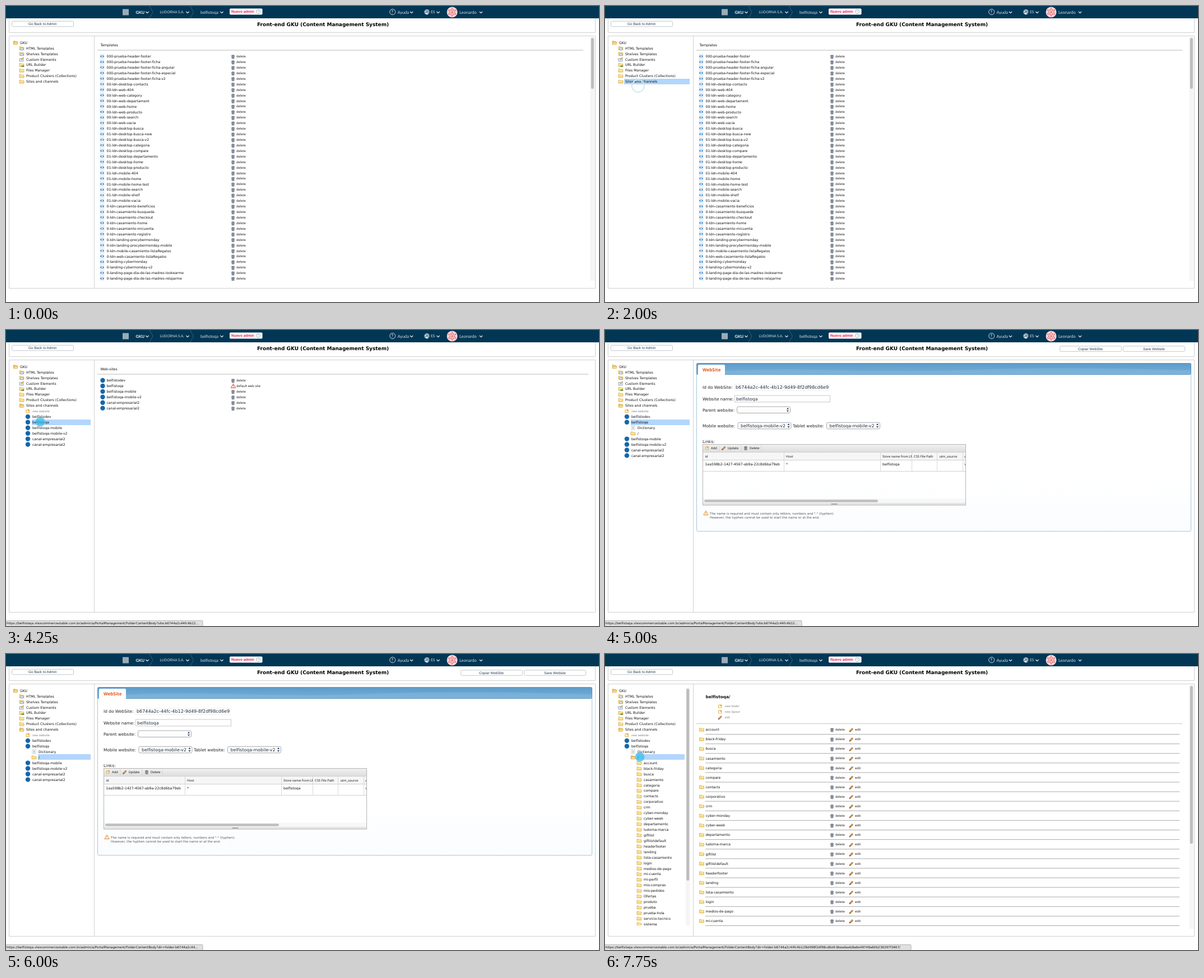
Animation of 1058x529 px, one loop 8 s. Source, as an HTML page:

```html
<!DOCTYPE html>
<html lang="es">
<head>
<meta charset="utf-8">
<title>Site manager</title>
<style>
html, body { margin: 0; height: 100%; overflow: hidden; background: #fff; }
svg { display: block; width: 100vw; height: 100vh; font-family: "DejaVu Sans", sans-serif; text-rendering: geometricPrecision; }
text { white-space: pre; }
.h { font-family: Lato, sans-serif; }
.o { font-family: "Open Sans", sans-serif; }
.a { font-family: "Liberation Sans", sans-serif; }
.b { font-weight: bold; }
.i { font-style: italic; }
</style>
</head>
<body>
<svg id="stage" viewBox="0 0 1058 529">
  <defs>
    <linearGradient id="bar" x2="0" y2="1"><stop stop-color="#5c9bca"/><stop offset="1" stop-color="#78b0d8"/></linearGradient>
    <linearGradient id="pane" x2="0" y2="1"><stop offset=".7" stop-color="#fff"/><stop offset="1" stop-color="#fafcfe"/></linearGradient>
    <linearGradient id="tool" x2="0" y2="1"><stop stop-color="#f1f1f1"/><stop offset="1" stop-color="#dedede"/></linearGradient>
    <clipPath id="treeClip"><path d="M6 54H157V485H6z"/></clipPath>
    <clipPath id="listClip"><path d="M158 54H1051V491H158z"/></clipPath>
    <clipPath id="idClip"><path d="M231 96H399V110H231z"/></clipPath>
    <clipPath id="colClip"><path d="M491 218H547.5V233H491z"/></clipPath>
    <clipPath id="gridClip"><path d="M174 204H643V314H174z"/></clipPath>
    <g id="folder"><path d="M-4 3V-2.6h3l1 1H4V3z" fill="#f8dc86" stroke="#d5a544" stroke-width=".7"/><path d="M-3.3-.3H3.3" stroke="#fff3c4" stroke-width=".9"/></g>
    <g id="open"><path d="M-3.6 3V-2.8h3l1 1H3.2V3z" fill="#efc65d" stroke="#cf9d39" stroke-width=".7"/><path d="M-3.6 3-2.2-.4H4.4L3.2 3z" fill="#fbe299" stroke="#d5a544" stroke-width=".6"/></g>
    <g id="shelf"><use href="#folder"/><path d="M-1.6-.6h4v4h-4z" fill="#e9f3fd" stroke="#5288bd" stroke-width=".7"/></g>
    <g id="custom"><path d="M-4-1.5H3V3.5H-4z" fill="#e6edf6" stroke="#7998b8" stroke-width=".8"/><path d="M-1 1 3.5-3.5" stroke="#e0a23c" stroke-width="1.7"/></g>
    <g id="link"><use href="#folder"/><path d="M-1 1.5H2V0l2.5 2.3L2 4.4V3H-1z" fill="#468a3d"/></g>
    <g id="site"><circle r="4.2" fill="#1766a8"/></g>
    <g id="doc"><path d="M-3.2-4H3.2V4H-3.2z" fill="#fafafa" stroke="#c5c9cd" stroke-width=".7"/><path d="M-1.4-1.6H1.4M-1.4 0H1.4M-1.4 1.6H1.4" stroke="#8b9299" stroke-width=".7"/></g>
    <g id="code"><path d="M-3.5-4H3.5V4H-3.5z" fill="#f4f8fc" stroke="#cad8e6" stroke-width=".6"/><path d="M-.8-1.8-2.7 0-.8 1.8M.8-1.8 2.7 0 .8 1.8" fill="none" stroke="#2878c4" stroke-width="1.2"/></g>
    <g id="trash"><path d="M-2.3-1.5H2.3L1.9 3.4H-1.9z" fill="#aeb8c4" stroke="#5d6876" stroke-width=".7"/><path d="M-3-2.1H3M-1-3H1M-.8-.8V2.6M.8-.8V2.6" stroke="#5d6876" stroke-width=".8"/></g>
    <g id="pencil"><path d="M-2.6 2.6 2.4-2.4" stroke="#8b5425" stroke-width="2.7"/><path d="M-2 2 2-2" stroke="#e8a552" stroke-width="1.4"/><path d="m-3.8 3.8.6-2.1 1.5 1.5z" fill="#333"/></g>
    <g id="spark"><path d="M-3-2.4H1M-3-2.4V2.5H2.5V0" fill="none" stroke="#ecbb55" stroke-width="1.2"/><path d="M1.5-4 2.3-2.2 4-1.5 2.3-.8 1.5 1 .7-.8-1-1.5.7-2.2z" fill="#f0a21d"/></g>
    <g id="warn"><path d="M0-3.8 4.2 3.5H-4.2z" fill="#fff" stroke="currentColor" stroke-linejoin="round"/><path d="M0-1.4V1.2M0 2V2.8" stroke="currentColor"/></g>
  </defs>
</svg>
<script>
const LOOP = 8000, STEP = 250, ROW = 9.93, SITE = 'belfisto';
const stage = document.getElementById('stage');

// y is the middle of the line
const text = (x, y, s, size = 6.1, cls = '', fill = '#111') =>
  `<text x="${x}" y="${y + size * .37}" font-size="${size}" class="${cls}" fill="${fill}">${s}</text>`;
const rect = (x, y, w, h, fill, stroke = 'none', r = 0) =>
  `<rect x="${x}" y="${y}" width="${w}" height="${h}" fill="${fill}" stroke="${stroke}" rx="${r}"/>`;
const circle = (x, y, r, fill, stroke = 'none') =>
  `<circle cx="${x}" cy="${y}" r="${r}" fill="${fill}" stroke="${stroke}"/>`;
const line = (d, color = '#bbb', w = 1) => `<path d="${d}" fill="none" stroke="${color}" stroke-width="${w}"/>`;
const icon = (id, x, y) => `<use href="#${id}" x="${x}" y="${y}"/>`;
const clip = (id, s) => `<g clip-path="url(#${id})">${s}</g>`;
const button = (x, y, s, tx) => rect(x, y, 110, 9.5, '#fff', '#c4c8cc', 2) + text(tx, y + 4.6, s, 6.3, 'a', '#24384f');
const scroll = (x, y, h, top, len) => rect(x, y, 8, h, '#f5f5f5') + rect(x + 1.3, top, 5, len, '#bdbdbd', 'none', 2.5);
const remove = y => icon('trash', 405, y + .6) + text(411, y, 'delete', 5.8, 'o');

function add(html) {
  const g = document.createElementNS('http://www.w3.org/2000/svg', 'g');
  g.innerHTML = html;
  stage.append(g);
  return g;
}

function header() {
  const pale = '#d4dfe7';
  const label = (x, s, size) => text(x, 11, s, size, 'h', pale);
  const chevrons = [252, 324, 385, 723.5, 771, 847.5]
    .map(x => line(`M${x - 2.6} 10l2.6 2.6 2.6-2.6`, '#dce5ec', 1.3)).join('');
  const dots = [...Array(12)].map((_, i) => {
    const a = i * Math.PI / 6, r = i % 2 ? 6.5 : 4.2;
    return circle(796 + r * Math.cos(a), 11 + r * Math.sin(a), 1.3, '#e3737c');
  }).join('');
  return rect(0, 0, 1058, 22, '#023655') +
    rect(208, 5.5, 11, 11, '#9aabb8') + chevrons +
    line('M256 0l6 11-6 11M328.5 0l6 11-6 11', '#47687f', .8) +
    text(231.5, 11, 'GKU', 7.2, 'h b', '#fff') +
    label(274.5, 'LUDORNA S.A.', 6.4) + label(347, SITE + 'qa', 7.4) +
    rect(399, 4.5, 58.5, 11, '#fff', 'none', 1.8) +
    text(402, 10, 'Nuevo admin', 6.5, 'a b', '#ef174f') +
    circle(450, 10, 3.6, 'none', '#a6b3bd') + text(448.4, 10, '?', 5.3, 'a', '#8c9ba6') +
    circle(689.7, 10.6, 5, 'none', pale) + text(687.5, 10.6, '?', 7.5, 'h b', pale) +
    label(698.5, 'Ayuda', 7.4) +
    circle(751, 10.8, 4.6, pale) + line('M748 8l3 1-1 3-3-1M752 8l3 2-1 4-2-2z', '#365d76') +
    label(758, 'ES', 6.7) +
    circle(796, 11, 9.5, '#f6d5d6') + dots + circle(796, 11, 1.8, '#e3737c') +
    label(809, 'Leonardo', 7.5) +
    line('M5.5 22V47.5H1051.5V22M5.5 53.5H1051.5V504.5H5.5zM157.5 54V504', '#d0d0d0') +
    button(10.5, 27.3, 'Go Back to Admin', 40) +
    text(448, 33, 'Front-end GKU (Content Management System)', 8.97, 'b', '#000');
}

const sites = ['dev', 'qa', 'qa-mobile', 'qa-mobile-v2'].map(s => SITE + s)
  .concat('canal-empresarial2', 'canal-empresarial2');
const folders = `account black-friday busca casamiento categoria compare contacts corporativo crm cyber-monday
cyber-week departamento ludorna-marca giftlist giftlistdefault headerfooter landing lista-casamiento login
medios-de-pago mi-cuenta mi-perfil mis-compras mis-pedidos Ofertas produto prueba prueba-hola servicio-tecnico
sistema`.split(/\s+/);
const groups = {
  '000-prueba-header-footer': ' -ficha -ficha-angular -ficha-especial -ficha-v2',
  '00-ldn-': 'desktop-contacts web-404 web-category web-departament web-home web-producto web-search web-vacia',
  '01-ldn-desktop-': 'busca busca-new busca-v2 categoria compare departamento home producto',
  '01-ldn-mobile-': '404 home home-test search shelf vacia',
  '0-ldn-': 'casamiento-beneficios casamiento-busqueda casamiento-checkout casamiento-home casamiento-micuenta ' +
    'casamiento-registro landing-precybermonday landing-precybermonday-mobile mobile-casamiento-listaRegalos web-casamiento-listaRegalos',
  '0-landing-': 'cybermonday cybermonday-v2 page-dia-de-las-madres-lookearme page-dia-de-las-madres-relajarme'
};
const templates = Object.entries(groups).flatMap(([head, tails]) => tails.split(' ').map(s => head + s));

// Each row: depth, icon, label
function tree(mode) {
  const rows = [[0, 'open', 'GKU'], [1, 'shelf', 'HTML Templates'], [1, 'shelf', 'Shelves Templates'],
    [1, 'custom', 'Custom Elements'], [1, 'link', 'URL Builder'], [1, 'folder', 'Files Manager'],
    [1, 'folder', 'Product Clusters (Collections)'], [1, mode ? 'open' : 'folder', 'Sites and channels']];
  if (mode) {
    rows.push([2, 'spark', 'new website'], ...sites.map(s => [2, 'site', s]));
    if (mode > 1) rows.splice(11, 0, [3, 'doc', 'Dictionary'], [3, mode > 2 ? 'open' : 'folder', '/']);
    if (mode > 2) rows.splice(13, 99, ...folders.map(s => [4, 'folder', s]));
  }
  const html = rows.map(([depth, id, s], i) => {
    const x = 17 + 11 * depth, y = 65.5 + ROW * i;
    return icon(id, x, y) + (id === 'spark' ? text(x + 8, y, s, 4.95, 'i', '#777') : text(x + 8, y, s));
  }).join('');
  return clip('treeClip', html + (mode > 2 ? scroll(144, 60, 425, 62, 343) : ''));
}

const templatePage = () => text(168.5, 69.5, 'Templates', 6.2) + line('M163 79H1030') +
  clip('listClip', templates.map((s, i) => {
    const y = 90 + 9.925 * i;
    return icon('code', 171.5, y) + text(179.5, y, s) + remove(y);
  }).join('')) + scroll(1042.5, 55, 436, 57, 91);

const sitePage = () => text(168.5, 69.5, 'Web-sites', 6.2) + line('M163 79H1039') +
  sites.map((s, i) => {
    const y = 90 + 9.925 * i;
    return icon('site', 172.5, y) + text(179.5, y, s) + (i === 1
      ? `<g color="#d8433c">${icon('warn', 405.5, y)}</g>` + text(411, y, 'default web site', 5.8, 'o')
      : remove(y));
  }).join('');

function formPage() {
  const label = (x, y, s) => text(x, y, s, 7.4, '', '#222');
  const value = (x, y, s, size = 7.8) => text(x, y, s, size, '', '#1d2c3d');
  const note = (y, s) => text(187, y, s, 5.6, '', '#555');
  const select = (x, y, s) => rect(x, y, 95, 11.5, '#fdfdfd', '#a9a9a9', 2.5) + value(x + 5, y + 5.7, s) +
    `<path d="M${x + 88.5} ${y + 4.8}h4l-2-3zM${x + 88.5} ${y + 6.8}h4l-2 3z" fill="#2b4566"/>`;
  const head = (x, y, s) => text(x, y, s, 5.8, 'o');
  const cell = (x, s) => text(x, 240, s, 6.2);
  const grid = rect(174.5, 204.5, 469, 13.5, 'url(#tool)') + rect(174.5, 218, 469, 14, '#f6f6f6') +
    line('M174 218.5H643M174 232.5H643M174 252.5H643', '#d0d0d0') +
    line('M204 206V217M243 206V217M279 206V217M319.5 219V252M491.5 219V252M547.5 219V252M592.5 219V252M638.5 219V252', '#d0d0d0', .8) +
    icon('spark', 182, 211) + head(189, 211, 'Add') + icon('pencil', 212, 211) + head(218.5, 211, 'Update') +
    icon('trash', 251, 211) + head(258, 211, 'Delete') +
    head(178.5, 225.5, 'id') + head(323, 225.5, 'Host') + clip('colClip', head(495, 225.5, 'Store name from LM')) +
    head(551, 225.5, 'CSS File Path') + head(596.5, 225.5, 'utm_source') + head(641, 225.5, 'a') +
    cell(178.5, '1ea598b2-1427-4567-ab9a-22c8d6ba79eb') + cell(323, '*') + cell(495, SITE + 'qa') + cell(641, 'v') +
    rect(175, 301.5, 468, 7.5, '#f7f7f7') + rect(177, 303.3, 310, 4.4, '#bebebe', 'none', 2.2) +
    rect(175, 309, 468, 4, '#e5e5e5') + rect(403.5, 310, 11, 2, '#aaa');
  return button(811.5, 28.8, 'Copiar WebSite', 844) + button(924.5, 28.8, 'Save Website', 960) +
    rect(163.5, 59.5, 882, 300.3, 'url(#pane)', '#a3c5df', 2.5) +
    rect(163.5, 59.5, 882, 20, 'url(#bar)', '#5e94be', 2) +
    '<path d="M214 73c140-8 260 5 410-1s280-4 421 0V79H214z" fill="#8bbce0" opacity=".35"/>' +
    '<path d="M166 80V64q0-2 2-2H212q2 0 2 2V80z" fill="#fff"/>' +
    text(174, 71.2, 'WebSite', 8, 'o b', '#e2591c') +
    label(174, 102.5, 'Id do WebSite:') + rect(231.5, 97, 168, 11.5, '#fff', '#eee') +
    clip('idClip', value(233, 102.5, 'b6744a2c-44fc-4b12-9d49-8f2df98cd6e9', 8.05)) +
    label(174, 123, 'Website name:') + rect(231.5, 117, 170, 11.7, '#fff', '#c8c8c8') + value(234, 123, SITE + 'qa') +
    label(174, 143, 'Parent website:') + select(235.5, 137, '') +
    label(174, 171, 'Mobile website:') + select(237, 165.3, SITE + 'qa-mobile-v2') +
    label(335, 171, 'Tablet website:') + select(395.5, 165.3, SITE + 'qa-mobile-v2') +
    label(174, 199.3, 'Links:') + clip('gridClip', grid) + rect(174.5, 204.5, 469, 108.5, 'none', '#b4b4b4') +
    `<g color="#e58a2c">${icon('warn', 180, 327)}</g>` +
    note(327.7, 'The name is required and must contain only letters, numbers and "-" (hyphen).') +
    note(334.6, 'However, the hyphen cannot be used to start the name or at the end.');
}

const folderPage = () => text(179.5, 76.7, SITE + 'qa/', 7.3, 'b') +
  ['new folder', 'new layout', 'edit'].map((s, i) =>
    icon(i < 2 ? 'spark' : 'pencil', 205.5, 93.5 + 10 * i) + text(213.5, 93.5 + 10 * i, s, 4.95, 'i', '#777')).join('') +
  line('M163 124.5H1030', '#c8c8c8') +
  folders.slice(0, 21).map((s, i) => {
    const y = 135 + 17.1 * i;
    return icon('folder', 172.5, y) + text(179.5, y, s) + remove(y) + icon('pencil', 439.5, y + .6) +
      text(446, y, 'edit', 5.8, 'o') + line(`M179 ${y + 8.5}H1025`, '#aaa');
  }).join('') + scroll(1042.5, 55, 436, 57, 282);

function statusBar(tail, width = 351.5) {
  return rect(-.5, 519.5, width, 10, '#e0e0e0', '#b4b4b4', 1) +
    text(1, 524.4, `https://${SITE}qa.vtexcommercestable.com.br/admin/a${tail}`, 5.67);
}

// Value of the last [time, value] entry reached
const at = (track, t) => track.reduce((v, [start, next]) => t >= start ? next : v, null);

const hover = add(rect(0, 0, 117, 10, '#b2d6fc')).firstChild;
add(header());
const trees = [0, 1, 2, 3].map(m => add(tree(m)));
const pages = [templatePage, sitePage, formPage, folderPage].map(f => add(f()));
const body = '/PortalManagement/FolderContentBody?';
const bars = [
  statusBar('#'),
  statusBar(body + 'site:b6744a2c44fc4b12...'),
  statusBar(body + 'dir=folder:b6744a2c44...'),
  statusBar(body + 'dir=folder:b6744a2c44fc4b129d498f2df98cd6e9:6bea6aeb8a6e49749a60b236397f3467/', 546.5)
].map(add);
const pointer = add('<circle/>').firstChild;

const treeTrack = [[0, 0], [3250, 1], [5000, 2], [7750, 3]];
const pageTrack = [[0, 0], [3250, 1], [5000, 2], [7500, 3]];
const barTrack = [[2250, 0], [4000, 1], [5750, 2], [7500, 3]];
const hoverTrack = [[2000, [34, 7]], [4000, [46, 10]], [5750, [57, 12]]];
const pointerTrack = [[750, 'ring'], [3000, 'press'], [3750, 'ring'], [4250, 'press'], [5000, null],
  [5500, 'ring'], [6000, null], [7500, 'press']];
const path = [[750, 239, 39], [1750, 61, 143.5], [2000, 59, 143], [3000, 50, 133], [3500, 50, 133],
  [4250, 61, 164], [5000, 61, 164], [5750, 58.5, 180], [7500, 62, 184], [LOOP, 62, 184]];

function position(t) {
  const i = path.findIndex(p => p[0] > t), [t0, x0, y0] = path[i - 1], [t1, x1, y1] = path[i];
  const u = (t - t0) / (t1 - t0), e = u * u * (3 - 2 * u);
  return [x0 + (x1 - x0) * e, y0 + (y1 - y0) * e];
}

function set(el, attrs) {
  for (const k in attrs) el.setAttribute(k, attrs[k]);
}

function show(list, index) {
  list.forEach((g, i) => g.style.display = i === index ? '' : 'none');
}

function draw(now) {
  const t = Math.floor(now % LOOP / STEP) * STEP;
  show(trees, at(treeTrack, t));
  show(pages, at(pageTrack, t));
  show(bars, at(barTrack, t));

  const spot = at(hoverTrack, t);
  hover.style.display = spot ? '' : 'none';
  if (spot) {
    const [x, row] = spot;
    set(hover, { x, y: Math.round(60.3 + ROW * row), width: (t >= 7750 ? 142 : 151) - x });
  }

  const mode = at(pointerTrack, t);
  pointer.style.display = mode ? '' : 'none';
  if (mode) {
    const [cx, cy] = position(t), press = mode === 'press';
    set(pointer, { cx, cy, r: press ? 8.5 : 11, fill: press ? '#35bbe8' : 'none', 'fill-opacity': .7,
      stroke: press ? 'none' : '#c3e8f4', 'stroke-width': 1.6 });
  }
  requestAnimationFrame(draw);
}
requestAnimationFrame(draw);
</script>
</body>
</html>
```
